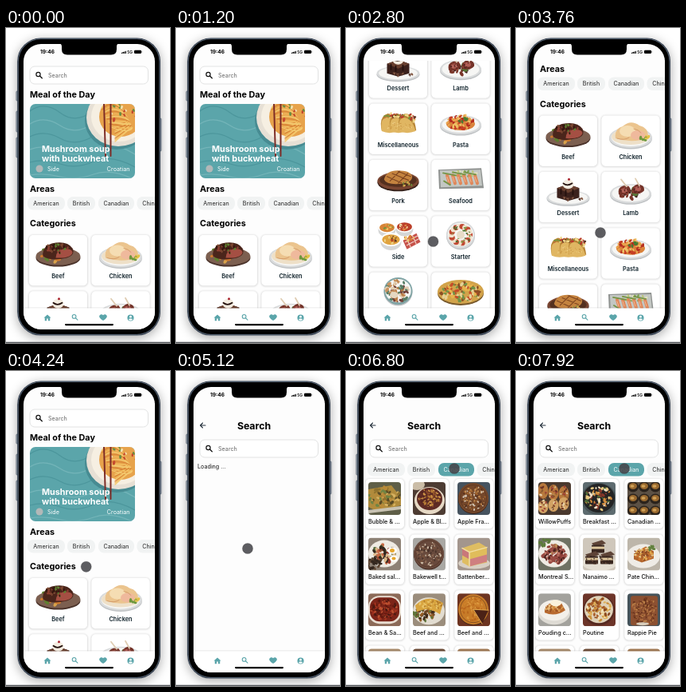
An HTML page for the animation above (8000 ms loop, 206x394 px).

```html
<!DOCTYPE html>
<html lang="en">
<head>
<meta charset="utf-8">
<title>Recipe app</title>
<style>
  html, body { margin: 0; width: 100%; height: 100%; overflow: hidden; background: #fff; }
  svg { display: block; width: 206px; height: 394px; font-family: Inter, Roboto, sans-serif; }
</style>
</head>
<body>
<svg id="stage" viewBox="0 0 206 394"></svg>
<script>
const TEAL = '#5ba5aa', INK = '#111';

// Shape helpers
const E = (x, y, rx, ry, fill, extra = '') => `<ellipse cx="${x}" cy="${y}" rx="${rx}" ry="${ry}" fill="${fill}" ${extra}/>`;
const R = (x, y, w, h, r, fill, extra = '') => `<rect x="${x}" y="${y}" width="${w}" height="${h}" rx="${r}" fill="${fill}" ${extra}/>`;
const F = (d, fill) => `<path d="${d}" fill="${fill}"/>`;
const L = (d, stroke, w = 1) => `<path d="${d}" fill="none" stroke="${stroke}" stroke-width="${w}" stroke-linecap="round" stroke-linejoin="round"/>`;
const T = (x, y, size, weight, fill, text, anchor = 'start') =>
  `<text x="${x}" y="${y}" font-size="${size}" font-weight="${weight}" fill="${fill}" text-anchor="${anchor}">${text.replace('&', '&amp;')}</text>`;
const G = (x, y, body, extra = '') => `<g transform="translate(${x} ${y})" ${extra}>${body}</g>`;
const scale = (x, y, k, body) => `<g transform="translate(${x} ${y}) scale(${k}) translate(${-x} ${-y})">${body}</g>`;
const group = (id, body) => `<g id="${id}">${body}</g>`;

let seed = 7;
const rnd = () => (seed = seed * 16807 % 2147483647) / 2147483647;

// Scatter n morsels inside an ellipse
function bits(n, x, y, rx, ry, size, colors) {
  let out = '';
  for (let i = 0; i < n; i++) {
    const a = rnd() * 6.283, d = Math.sqrt(rnd()), s = size * (.6 + rnd() * .6);
    const px = (x + Math.cos(a) * rx * d).toFixed(1), py = (y + Math.sin(a) * ry * d).toFixed(1);
    out += E(px, py, s.toFixed(1), (s * .6).toFixed(1), colors[i % colors.length],
      `transform="rotate(${Math.round(rnd() * 180)} ${px} ${py})"`);
  }
  return out;
}
const plate = (rx, ry, y = 0, rim = '#d9dbdc', fill = '#f6f6f4') =>
  E(0, y + 1.5, rx, ry, '#bfc2c4') + E(0, y, rx, ry, rim) + E(0, y - .3, rx * .9, ry * .86, fill);
const bowl = (x, y, r, colors) => E(x, y + 3, r, r * .8, '#d5d6d6') + E(x, y, r, r * .65, '#fff') +
  E(x, y, r * .86, r * .5, colors[0]) + bits(18, x, y, r * .7, r * .35, 1.7, colors);

// Category pictures, centred on 0,0
const dishes = {
  Beef: () => E(0, 5, 28, 11, '#4b332b') + E(0, 3, 28, 11, '#7c5f50') +
    bits(24, -9, 1, 15, 9, 3.6, ['#ce7b2d', '#5f7f2f', '#d8a24b']) +
    F('M-19 3q-2-12 11-16q19-4 26 6q4 9-7 12q-20 5-30-2z', '#4b251b') +
    F('M-3 5q0-9 9-11q11-1 12 4q-1 8-21 7z', '#a54f43') + bits(34, -2, -6, 16, 6, 2, ['#7c4832', '#32170f', '#5f8332', '#8e3f31']),
  Chicken: () => plate(27, 13, 4) + E(0, 3, 24, 10, '#eee0c8') +
    F('M-19 5q-2-12 9-15q10-9 21-1q12 3 11 15q-19 8-41 1z', '#ebc48e') + E(-4, -4, 10, 7, '#f5ddb3') + E(9, 1, 9, 6, '#efb99c') +
    bits(8, 17, 5, 7, 4, 2.5, ['#6c983e', '#e2c148']) + L('M-17 5q9 3 15-1M4-7q6 1 9 5', '#d59d6b'),
  Dessert: () => plate(27, 9, 9) + F('M-14-3L0-8l14 5v12L0 13l-14-4z', '#3b211c') + F('M-14-3L0-8l14 5L0 3z', '#69402f') +
    E(0, -8, 7, 6, '#f3ece0') + L('M-6-9q5 4 11 0M-9-2v6m6-4v8m9-9v6', '#24110e', 1.8) + E(1, -14, 1.5, 1.5, '#a9242f') +
    bits(16, 0, 11, 20, 3, 1.5, ['#4c2b22', '#815641']),
  Lamb: () => plate(26, 12, 4) + bits(20, 1, 4, 15, 6, 3, ['#7a3529', '#42211c', '#587637']) +
    F('M-15 5q-2-9 6-11q8-1 9 5q-1 8-15 6zM1 3q0-9 8-11q9 1 8 8q-5 6-16 3z', '#743329') +
    L('M-5-5l-7-9M11-6l-5-9', '#dfcdb3', 1.8) + E(-8, 0, 4, 3, '#b5665c') + E(9, -2, 4, 3, '#b05d55') +
    bits(20, 1, 0, 14, 6, 1.3, ['#4b211b', '#93453a']),
  Miscellaneous: () => scale(10, 0, .85, [-13, 0, 13].map(x => F(`M${x - 13} 12q-5-21 9-25q13 1 16 25z`, '#b88535') +
    bits(26, x + 1, -6, 11, 7, 2.4, ['#70933d', '#b93c2d', '#f0d78a', '#5b3423']) +
    F(`M${x - 13} 13q-3-19 7-20q12 1 17 20q-13 5-24 0z`, '#e0b662')).join('') + bits(40, 0, 6, 20, 6, 1, ['#c99442', '#efcf87'])),
  Pasta: () => plate(26, 12, 3) + E(0, 2, 18, 8, '#d9823b') +
    bits(70, 0, 0, 17, 9, 2.4, ['#e9a44d', '#c73f24', '#eec165', '#b62f20']) + bits(8, 0, -4, 8, 4, 2, ['#477c32']),
  Pork: () => scale(0, 2, .93, E(0, 5, 28, 12, '#35211b') + E(0, 3, 28, 12, '#7a4632') + E(0, 2, 25, 9, '#54301f') +
    F('M-19 1q3-12 18-12q18 0 20 8q0 9-18 10q-17 1-20-6z', '#c4833f') +
    L('M-15-3l20 9M-8-7l22 9M0-10l17 7M-11 3l13-13M0 6l13-13', '#7d4420', 1.2) + bits(12, 12, 7, 9, 3, 1.7, ['#6b8739', '#dbab50'])),
  Seafood: () => F('M-28-11L26-13L29 12L-27 13z', '#8f9290') + F('M-26-10L25-11L27 9L-25 11z', '#c3c7c3') +
    bits(26, 0, -6, 21, 4, 2.2, ['#b8c36d', '#7ea151', '#dfe0bd']) +
    [-17, -10, -3, 4, 11, 18].map(x => L(`M${x}-4l3 10`, '#e0875a', 4) + L(`M${x}-2l2 6`, '#f2b991', 1)).join('') +
    L('M-22-7l16 3M-10-8l16 3M4-8l15 3M-21 3l8 5', '#769447', 1.8),
  Side: () => bowl(-14, -9, 11, ['#d78437', '#f0c55f', '#739440']) + bowl(8, -10, 11, ['#bb3f29', '#e18d43', '#f2dfab']) +
    bowl(-9, 6, 13, ['#e0a33f', '#b84526', '#eed486', '#5d3a22']) + F('M6 7l17-9l5 11l-17 9z', '#c6524a') +
    L('M9 9l16-8M11 13l15-8M11 5l5 11M18 1l5 11', '#f1d7cd', 1.1) + bits(8, 13, 4, 7, 4, 2.3, ['#d67e32', '#efca72']),
  Starter: () => plate(18, 17) + [...Array(18)].map((_, i) => {
    const a = i * .349;
    return E((Math.cos(a) * 11.5).toFixed(1), (Math.sin(a) * 10.5).toFixed(1), 3.6, 3.4, i % 2 ? '#f0e4cf' : '#c14a34');
  }).join('') + bits(18, 0, 0, 13, 12, 1.6, ['#456f31', '#819d46']) + E(0, 0, 5, 5, '#e8dcc8'),
  Vegan: () => plate(18, 17, 0, '#7fa3a4') + bits(70, 0, 0, 15, 14, 2.7, ['#ba7d47', '#e0ccb0', '#577e65', '#c8915e', '#70403a']) +
    E(-5, 5, 5, 4, '#e5d8c2'),
  Vegetarian: () => E(0, 3, 29, 15, '#78592c') + E(0, 1, 29, 15, '#d2a34a') +
    bits(100, 0, 1, 25, 12, 2.7, ['#e7b44c', '#c74e29', '#e6d197', '#719448', '#8d4f25']),
  Breakfast: () => plate(26, 14, 2) + bits(22, 0, 1, 20, 9, 4, ['#b45d36', '#dba552', '#758d41']) +
    E(-6, -1, 8, 5, '#fff') + E(-6, -1, 3, 2.5, '#edac2f'),
  Goat: () => plate(26, 14, 2) + bits(36, 0, 1, 19, 9, 4, ['#6d3825', '#9e5d35', '#c58a48', '#577236'])
};

// Result pictures, 41 x 41
const food = (bg, base, colors, rx = 17, ry = 16, n = 80, size = 2) =>
  R(0, 0, 41, 41, 0, bg) + E(20, 21, rx + 2, ry + 2, '#0003') + E(20, 20, rx, ry, base) +
  bits(n, 20, 20, rx * .85, ry * .85, size, colors);
const dinner = (bg, colors, n = 46) => R(0, 0, 41, 41, 0, bg) + E(20, 20, 20, 17, '#efebe3') + bits(n, 20, 20, 14, 11, 3, colors);
const tart = (bg, color, crumbs) => R(0, 0, 41, 41, 0, bg) + E(20, 21, 19, 19, '#3d241b') + E(20, 20, 19, 19, color) +
  E(20, 20, 16.500, 16.500, 'none', 'stroke="#4f2b1a" stroke-opacity=".5"') + bits(100, 20, 20, 15, 15, 1.5, crumbs);
const block = (x, y, w, h, a, b) => F(`M${x} ${y}l${w}-4l5 4l-${w} 5z`, a) + R(x, y + 2, w + 3, h, 1, b);

const british = [
  ['Bubble & ...', () => R(0, 0, 41, 41, 0, '#5f5f48') + F('M0 9L29 4L41 19V29L12 37L0 31z', '#b08b3c') +
    bits(75, 20, 19, 20, 12, 2.6, ['#d6b160', '#8f722f', '#6f8444', '#b98a39', '#594a25']) + L('M0 37L41 32', '#c9c3b3', 4)],
  ['Apple & Bl...', () => R(0, 0, 41, 41, 0, '#4d3c33') + E(5, 3, 10, 7, '#cbbda7') + E(21, 23, 19, 17, '#e6d9c5') + E(21, 21, 16, 14, '#5e2b25') +
    bits(80, 21, 19, 14, 11, 1.8, ['#cf9646', '#b57a35', '#8c4c2a', '#55251f'])],
  ['Apple Fra...', () => tart('#46535f', '#74472a', ['#a4662f', '#d5c6b4', '#54301f', '#c18a4d'])],
  ['Baked sal...', () => dinner('#8d8175', ['#c66a45', '#993c2c', '#4c6638', '#dcb98a', '#33291f']) + E(30, 16, 6, 4, '#fff') +
    E(30, 16, 3, 2.5, '#e7a72d') + E(32, 26, 5, 4, '#fff') + E(32, 26, 2.5, 2, '#e7a72d') + bits(26, 7, 31, 10, 8, 3, ['#33271f', '#5c4431'])],
  ['Bakewell t...', () => tart('#a9a8a4', '#684a3d', ['#8e6b55', '#cdbca7', '#49332a', '#77523d'])],
  ['Battenber...', () => R(0, 0, 41, 41, 0, '#a3968d') + E(21, 32, 20, 7, '#d8cfc3') + F('M6 13L27 6l10 6v19L15 36L6 31z', '#dfbd62') +
    F('M15 18l22-6v9l-22 6z', '#e0bd5b') + F('M6 13l9 5v9l-9-5z', '#c9777a') + F('M15 27l22-6v9l-22 6z', '#cf7f80') + L('M6 13l9 5l22-6M15 18v18', '#f1dfa4', 1.5)],
  ['Bean & Sa...', () => R(0, 0, 41, 41, 0, '#8c6a58') + R(0, 3, 41, 35, 14, '#e9ded2') + R(2, 5, 37, 30, 12, '#7c2519') +
    bits(110, 20, 20, 16, 13, 2, ['#a2331f', '#66190f', '#bd5130', '#491a12'])],
  ['Beef and ...', () => R(0, 0, 41, 41, 0, '#9b8d7c') + E(20, 22, 20, 17, '#e2dcd0') + bits(40, 14, 26, 13, 8, 2.6, ['#6e4625', '#965e25', '#5f7439', '#3e2a19']) +
    F('M3 15Q18 0 38 12L34 26Q18 16 5 23z', '#d8a43f') + bits(40, 22, 14, 14, 6, 1.6, ['#e9c469', '#b57d2c'])],
  ['Beef and ...', () => tart('#6d3421', '#c77b28', ['#dc9a40', '#b8651d', '#d0832d']) + F('M20 20L39 21L31 38z', '#4b2216') + L('M20 20L39 21M20 20l11 18', '#e0a850')]
];
const canadian = [
  ['WillowPuffs', () => R(0, 0, 41, 41, 0, '#4a392e') + [6, 19, 32].map((x, i) => E(x, 11 + i * 2, 6.5, 10, '#b8793d') +
    E(x, 31 - i * 2, 6.5, 8, '#d3a364') + bits(22, x, 20, 5, 16, 1.8, ['#e6d0ab', '#6d3423', '#9c4236', '#8b5a30'])).join('')],
  ['Breakfast ...', () => food('#5d6b6f', '#232425', ['#d08a3b', '#e6c880', '#86372a', '#eee0c6', '#4f6a37', '#2b2420'], 20, 18, 80, 2.4)],
  ['Canadian ...', () => R(0, 0, 41, 41, 0, '#5c5145') + [7, 21, 35].map(x => [6, 21, 36].map(y =>
    E(x, y, 7, 6.4, '#2b231c') + E(x, y - 1, 5, 4, '#99692f') + E(x - 1, y - 1, 2.5, 1.8, '#d0a157')).join('')).join('')],
  ['Montreal S...', () => dinner('#6f7263', ['#8e3d37', '#a85b4a', '#592621', '#b98b52']) + L('M6 23l12-9M15 30l16-14M25 31l9-9', '#984a42', 5) +
    bits(45, 21, 22, 15, 10, 1.7, ['#6d2f2a', '#c07a68', '#44211c']) + bits(9, 8, 6, 8, 4, 3, ['#5d7b3a'])],
  ['Nanaimo ...', () => R(0, 0, 41, 41, 0, '#cfc7bb') + E(21, 32, 22, 9, '#e4ded3') + [[11, 7], [3, 21], [22, 21]].map(([x, y]) =>
    block(x, y, 13, 10, '#5e4437', '#392720') + R(x, y + 4, 16, 3, 0, '#dcc69c')).join('') + bits(30, 21, 28, 18, 6, 1, ['#6b4b3a', '#2e1f19'])],
  ['Pate Chin...', () => R(0, 0, 41, 41, 0, '#bdb6aa') + E(20, 23, 21, 15, '#efece6') + F('M8 20L23 11l10 6v9L18 31L8 27z', '#b0642c') +
    bits(60, 20, 20, 12, 8, 2, ['#e0a64c', '#cc7631', '#8e4c27', '#ebcd8c']) + bits(6, 31, 11, 6, 4, 2.5, ['#62803d'])],
  ['Pouding c...', () => R(0, 0, 41, 41, 0, '#a3a29d') + E(20, 25, 20, 14, '#dedbd4') + E(20, 21, 19, 13, '#f3f0ea') + F('M8 20q5-12 21-8l5 9q-13 9-26 3z', '#b96a2f') +
    bits(50, 20, 18, 12, 5, 1.8, ['#d9974a', '#9e5524', '#e8c183']) + E(22, 12, 7, 4, '#fbf2dd')],
  ['Poutine', () => food('#6d3529', '#dfd2b9', ['#cb8f3b', '#dfb05a', '#8b4a22', '#f0e0b8', '#a85c2a'], 18, 17, 90, 2.4)],
  ['Rappie Pie', () => R(0, 0, 41, 41, 0, '#46545b') + R(4, 3, 34, 37, 3, '#8c5031') + bits(150, 21, 22, 16, 17, 1.6, ['#a9683c', '#743b20', '#bb8048', '#63301b']) + E(19, 38, 8, 2, '#d8cdbb')]
];

const card = (x, y, w, h) => [[5, .025], [3, .035], [1.2, .06]].map(([width, alpha]) =>
  R(x, y + .5, w, h, 5, '#fff', `stroke="#000" stroke-opacity="${alpha}" stroke-width="${width}"`)).join('') + R(x, y, w, h, 5, '#fff');
const lens = (x, y, color) => E(x - 1, y - 1, 2.6, 2.6, 'none', `stroke="${color}" stroke-width="1.2"`) + L(`M${x + 1} ${y + 1}l2.8 2.8`, color, 1.3);
const searchBox = y => R(30, y, 148.5, 22, 6, '#fff', 'stroke="#e2e3e3"') + lens(41.5, y + 11, INK) + T(53, y + 13.6, 7.2, 400, '#666', 'Search');
const heading = (y, text) => T(30, y, 10.8, 700, '#000', text);
const chips = (y, active) => [['American', 27, 47], ['British', 77, 35], ['Canadian', 116, 45], ['Chinese', 164.5, 41]]
  .map(([name, x, w]) => R(x, y, w, 16.5, 7, name === active ? TEAL : '#f1f3f3') +
    T(x + w / 2, y + 10.8, 7.2, 400, name === active ? '#fff' : '#222', name, 'middle')).join('');

const meal = `<g clip-path="url(#meal)">` + R(30, 95, 132, 93, 0, TEAL) +
  [0, 1, 2, 3, 4, 5].map(i => L(`M30 ${104 + i * 16}q18-${13 - i * 2} 38 2t42-3t52 7`, i % 2 ? '#74b5b9' : '#4c969c', 1.2)).join('') +
  E(139, 116, 40, 36, '#478b92') + E(141, 112, 40, 36, '#e7e0d5') + E(142, 111, 35, 31, '#f6efe2') + E(144, 111, 27, 25, '#e7a34c') +
  [...Array(13)].map((_, i) => L(`M${120 + i} ${100 + i * 2}q${10 + i} ${-16 + i * 2} 26 2t${-9 - i} 16`, ['#f4cb72', '#d98637', '#f1b95b'][i % 3], 1.3)).join('') +
  bits(14, 145, 111, 19, 16, 2.4, ['#c54a2e', '#6b8e42', '#f3dfa9']) +
  L('M123 94L125 160M131.5 94L131.5 160', '#7d2c26', 2) + '</g>' +
  T(45, 155, 10.8, 700, '#fff', 'Mushroom soup') + T(45, 167, 10.8, 700, '#fff', 'with buckwheat') +
  E(42, 176, 4.5, 4.5, '#b3b8b8') + T(52, 178.6, 7.2, 400, '#fff', 'Side') + T(155.5, 178.6, 7.2, 400, '#fff', 'Croatian', 'end');

const categories = Object.entries(dishes).map(([name, draw], i) => {
  const x = i % 2 ? 107.5 : 29, y = 259 + (i >> 1) * 70.3;
  return card(x, y, 73, 63) + G(x + 36.5, y + 23.5, draw(), 'filter="url(#photo)"') + T(x + 36.5, y + 54, 7.4, 600, '#10222b', name, 'middle');
}).join('');

const home = searchBox(48) + heading(87, 'Meal of the Day') + meal + heading(204.5, 'Areas') + chips(211, '') + heading(248, 'Categories') + categories;

const results = list => list.map(([name, draw], i) => {
  const x = 24.5 + i % 3 * 56, y = 135 + (i / 3 | 0) * 69.6;
  return card(x, y, 48.5, 62) + G(x + 3.5, y + 4, `<g filter="url(#photo)">${draw()}</g>`, 'clip-path="url(#thumb)"') +
    T(x + 3.5, y + 55.6, 7.3, 500, INK, name);
}).join('') + [0, 1, 2].map(i => card(24.5 + i * 56, 343.5, 48.5, 62) +
  R(28 + i * 56, 347.5, 41, 41, 4, ['#a88b6c', '#6d4d38', '#a17a55'][i])).join('');

const icons = [
  [52, F('M47 362.5L52 358l5 4.5h-1.4v4.2h-2.6v-3h-2v3h-2.6v-4.2z', TEAL)],
  [86.5, lens(86.5, 361.7, TEAL)],
  [122, F('M122 366.5q-9-6-3.3-8.7q2-.6 3.3 1.2q1.3-1.8 3.3-1.2q5.7 2.7-3.3 8.7z', TEAL)],
  [156.5, E(156.5, 362.5, 4.5, 4.5, TEAL) + E(156.5, 361, 1.5, 1.5, '#fff') + E(156.5, 364.8, 2.7, 1.3, '#fff')]
];
const nav = R(20, 349, 170, 2, 0, '#0000000d') + R(20, 350.5, 170, 30, 0, '#fff') +
  icons.map(([x, body]) => scale(x, 362.5, .9, body)).join('') + R(74, 370, 61, 2.2, 1.1, '#000');

const status = T(43, 32.3, 6.6, 700, '#000', '19:46') +
  [0, 1, 2, 3].map(i => R(145 + i * 1.6, 30.8 - i * .7, 1.1, 1.2 + i * .7, .2, '#000')).join('') +
  T(152.3, 32.2, 5, 600, '#000', '5G') + R(161, 27.7, 9, 4.3, 1.2, '#000') + R(170.4, 29, .8, 1.7, .3, '#777');

const button = (x, y, h) => R(x, y, 2.5, h, 1, '#a9b5c4', 'stroke="#4b586a" stroke-width=".5"');
const phone = button(12.8, 79, 12) + button(12.8, 104, 26) + button(12.8, 137, 25) + button(192.6, 113, 41) +
  R(14.8, 13, 178.6, 371, 29, '#000', 'stroke="#2f3947" stroke-width="1.2" filter="url(#soft)"') +
  R(15.4, 13.6, 177.4, 369.8, 28.5, 'none', 'stroke="#8496ad" stroke-width=".6"');

document.getElementById('stage').innerHTML = `<defs>
  <filter id="soft" x="-20%" y="-10%" width="140%" height="120%"><feDropShadow dx="0" dy="3" stdDeviation="7" flood-color="#000" flood-opacity=".34"/></filter>
  <filter id="photo"><feGaussianBlur stdDeviation=".4"/></filter>
  <clipPath id="screen">${R(22, 20, 165, 357, 22, '#000')}</clipPath>
  <clipPath id="body">${R(22, 41, 165, 310, 0, '#000')}</clipPath>
  <clipPath id="meal">${R(30, 95, 132, 93, 7, '#000')}</clipPath>
  <clipPath id="thumb">${R(0, 0, 41, 41, 4, '#000')}</clipPath></defs>` +
  phone + R(0, 392.7, 206, 1.3, 0, '#55585c') + `<g clip-path="url(#screen)">` + R(20, 17, 170, 362, 0, '#fdfdfd') +
  `<g clip-path="url(#body)">` + group('home', home) +
  group('search', L('M37 68h-6.5m3-3l-3 3l3 3', '#27333f', 1.1) + T(98, 73, 12.3, 700, '#000', 'Search', 'middle') + searchBox(86) +
    group('loading', T(27, 122, 7.2, 400, INK, 'Loading ...')) + group('gridB', results(british)) + group('gridC', results(canadian)) +
    group('chipsB', chips(115, 'British')) + group('chipsC', chips(115, 'Canadian'))) +
  '</g>' + status + nav + '</g>' +
  F('M67 19h75q-3 1-3 4v3.500q0 7-7 7h-55q-7 0-7-7v-3.500q0-3-3-4z', '#000') +
  group('cursor', E(0, 0, 6.6, 6.6, '#454549', 'fill-opacity=".87" stroke="#333" stroke-opacity=".4" stroke-width=".6"'));

// Eased value at time t between [time, value] keys
function track(t, keys) {
  if (t <= keys[0][0]) return keys[0][1];
  for (let i = 1; i < keys.length; i++) {
    const [t0, a] = keys[i - 1], [t1, b] = keys[i];
    if (t < t1) {
      const u = (t - t0) / (t1 - t0);
      return a + (b - a) * u * u * (3 - 2 * u);
    }
  }
  return keys[keys.length - 1][1];
}

const $ = id => document.getElementById(id);
const show = (id, on) => $(id).style.display = on ? '' : 'none';
const move = (id, x, y) => $(id).setAttribute('transform', `translate(${x.toFixed(2)} ${y.toFixed(2)})`);
const OPEN = 4880, LOADED = 5680, PICK = 6640, SWAP = 7200;
const scrollKeys = [[2080, 0], [3145, 405], [3360, 405], [4040, 0]];
const cursorX = [[1760, 120], [2000, 109.5], [3145, 109.5], [3360, 106], [4040, 106], [4560, 90], [5840, 90], [6480, 136]];
const cursorY = [[1760, 300], [2000, 267], [3145, 267], [3360, 256], [4040, 256], [4560, 222], [5840, 222], [6480, 122]];

function draw() {
  const t = Math.floor(performance.now() % 8000 / 80) * 80;
  show('home', t < OPEN);
  show('search', t >= OPEN);
  show('loading', t < LOADED);
  show('gridB', t >= LOADED && t < SWAP);
  show('gridC', t >= SWAP);
  show('chipsB', t >= LOADED && t < PICK);
  show('chipsC', t >= PICK);
  show('cursor', t >= 1760);
  move('home', 0, -track(t, scrollKeys));
  move('cursor', track(t, cursorX), track(t, cursorY));
  requestAnimationFrame(draw);
}
draw();
</script>
</body>
</html>
```
